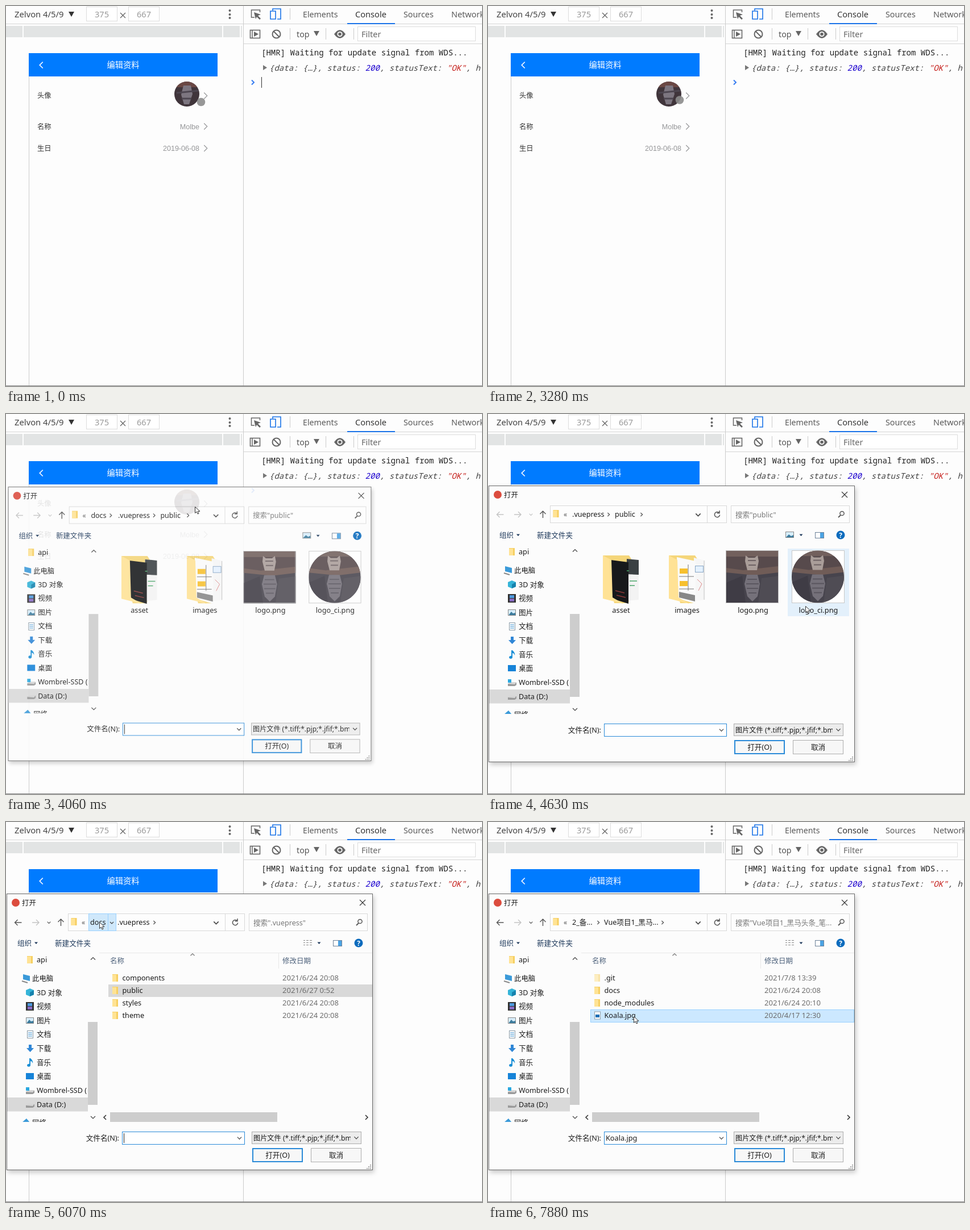
These frames come from a looping animation (837x669 px, 8000 ms). An HTML page:

```html
<!DOCTYPE html>
<html lang="zh">
<head>
<meta charset="utf-8">
<style>
html, body { margin: 0; width: 100%; height: 100%; overflow: hidden; background: #fdfdfd; }
svg { display: block; font-family: "Noto Sans", "Noto Sans CJK SC", "Noto Sans CJK", sans-serif; }
text { white-space: pre; }
.mono { font-family: "Noto Sans Mono", monospace; }
.arial { font-family: "Liberation Sans", sans-serif; }
#frame { filter: drop-shadow(2px 4px 4px rgba(0,0,0,.22)); }
</style>
</head>
<body>
<svg id="stage" width="837" height="669" viewBox="0 0 837 669"></svg>
<script>
const LOOP = 8000;
const text = (x, y, s, fill = '#1c1c1c', size = 12.7, more = '') =>
  `<text x="${x}" y="${y}" fill="${fill}" font-size="${size}" ${more}>${s}</text>`;
const rect = (x, y, w, h, fill, stroke = 'none', sw = 1) =>
  `<rect x="${x}" y="${y}" width="${w}" height="${h}" fill="${fill}" stroke="${stroke}" stroke-width="${sw}"/>`;
const line = (d, stroke, w = 1, fill = 'none') =>
  `<path d="${d}" fill="${fill}" stroke="${stroke}" stroke-width="${w}"/>`;
const shape = (d, fill) => `<path d="${d}" fill="${fill}"/>`;
const dot = (x, y, r, fill, more = '') => `<circle cx="${x}" cy="${y}" r="${r}" fill="${fill}" ${more}/>`;
const clip = (x, y, w, h, s) =>
  `<svg x="${x}" y="${y}" width="${w}" height="${h}" viewBox="${x} ${y} ${w} ${h}">${s}</svg>`;
const at = (x, y, s) => `<g transform="translate(${x} ${y})">${s}</g>`;
// turn: 0 right, 90 down, 180 left, 270 up
const chevron = (x, y, turn = 0, size = 3.5, color = '#444', w = 1.2) =>
  `<path d="M${-size / 2} ${-size}L${size / 2} 0L${-size / 2} ${size}" fill="none" stroke="${color}"
    stroke-width="${w}" transform="translate(${x} ${y}) rotate(${turn})"/>`;
const middle = 'text-anchor="middle"', end = 'text-anchor="end"';

const folder = (x, y, fade = 1) => at(x, y,
  `<g opacity="${fade}">${rect(0, 0, 10, 13, '#f6cf62')}${rect(0, 1, 7, 12, '#ffe394')}</g>`);
const bigFolder = (x, pages) => at(x, 249,
  shape('M0 0H46L50 6V72L44 84H20Z', '#f5d67a') + pages + shape('M0 0L15 8L17 74L36 85L0 76Z', '#ffe295'));
const arrow = (x, y, turn, color) =>
  `<path d="M6 0H-6M-1 -5L-6 0L-1 5" fill="none" stroke="${color}" stroke-width="1.4"
    transform="translate(${x} ${y}) rotate(${turn})"/>`;
const drive = (x, y) => at(x, y, shape('M0 4L4 2H15V6L12 8H0Z', '#9a9a9a') + shape('M0 4L4 1H15L12 5Z', '#d5d5d5'));

const photo = rect(0, 0, 92, 92, '#47444d') + rect(0, 0, 92, 10, '#72605d') + rect(0, 10, 92, 24, '#574a4c') +
  shape('M0 30L30 34L92 27V38L50 43L0 38Z', '#705c57') + shape('M0 56L28 44L34 92H0Z', '#3f3c45') +
  shape('M62 48L92 44V92H56Z', '#4f4c54') +
  shape('M34 8L39 12H50L55 8L57 18L54 34H37L33 18Z', '#a99d99') +
  shape('M36 42H55L59 58L55 80L46 89L37 80L32 58Z', '#75717a') +
  line('M37 50H54M35 58H57M36 66H56M39 74H53', '#5a565f', 2) + line('M38 17H52M39 25H52', '#6e6264', 2);
const avatar = `<g clip-path="url(#round)">${rect(296, 133, 44, 44, '#40353b')}${rect(296, 133, 44, 10, '#6b4844')}
  ${shape('M312 140H325L328 155L322 173H313L308 156Z', '#7d7680')}
  ${line('M300 153L338 149M309 163H326', '#4d4650', 3)}</g>`;

const toolbar = () => text(15, 20, 'Zelvon 4/5/9', '#444', 14.8) + shape('M110 10H120L115 19Z', '#333') +
  rect(141.5, 1.5, 54, 25, '#fff', '#ddd') + rect(215.5, 1.5, 54, 25, '#fff', '#ddd') +
  text(168.5, 20, '375', '#999', 14.5, middle) + text(242.5, 20, '667', '#999', 14.5, middle) +
  line('M201 12L210 21M210 12L201 21', '#666', 1.3) +
  [8, 15, 21].map(y => dot(393.5, y, 2, '#666')).join('') + line('M0 31.5H837', '#d5d5d5') +
  [[0, 29], [31, 349], [382, 29], [413, 2]].map(([x, w]) => rect(x, 35, w, 20, '#e2e4e4')).join('');

const phone = () => line('M40.5 83V669', '#ccc') + rect(40, 83, 332, 41, '#007bff') +
  chevron(62, 104, 180, 5.5, '#fff', 1.6) + text(206, 109, '编辑资料', '#fff', 14.3, middle) +
  text(55, 162, '头像', '#333', 12.3) + text(55, 216.5, '名称', '#333', 12.3) + text(55, 255, '生日', '#333', 12.3) +
  text(340, 216.5, 'Molbe', '#969799', 12.6, end + ' class="arial"') +
  text(340, 255, '2019-06-08', '#969799', 12.5, end + ' class="arial"') +
  [158, 212, 250.5].map(y => chevron(351, y, 0, 5.5, '#969799')).join('') + avatar;

const devtools = () => {
  const gray = '#666';
  return line('M417.5 0V669', '#ccc') +
    line('M437 20H431.5V7H446.5V11', gray, 1.5) + shape('M436 11L448 15L443 17L448 22L446 24L441 19L439 23Z', gray) +
    line('M469 8V5H483V23H477M465 9H474V23H465Z', '#1a73e8', 1.6) +
    line('M499.5 4V24M499.5 39V59M562.5 39V59M611.5 39V59', '#ccc') +
    text(522, 20, 'Elements', '#5a5a5a', 14.2) + text(614, 20, 'Console', '#333', 14.6) +
    text(699, 20, 'Sources', '#5a5a5a', 14.3) + text(783, 20, 'Network', '#5a5a5a', 14.4) +
    rect(600, 30, 84, 2, '#1a73e8') +
    rect(429.5, 42.5, 17, 14, 'none', gray, 1.6) + line('M433 42V57', gray, 1.5) + shape('M436 45L444 49.5L436 54Z', gray) +
    dot(475.5, 49.5, 7, 'none', `stroke="${gray}" stroke-width="2"`) + line('M471 45L480 54', gray, 2) +
    text(511, 54.5, 'top', '#555', 14.3) + shape('M541 44H551L546 53Z', gray) +
    shape('M577 49.5Q587 35 597 49.5Q587 64 577 49.5Z', gray) + dot(587, 49.5, 4.6, '#fdfdfd') + dot(587, 49.5, 2.8, gray) +
    rect(618.5, 36.5, 207, 25, '#fff', '#ddd') + text(625, 55, 'Filter', '#666', 14.5) + line('M418 66.5H837', '#d5d5d5') +
    text(449, 86.5, '[HMR] Waiting for update signal from WDS...', '#222', 14.05, 'class="mono"') +
    shape('M452 104L459 108.5L452 113Z', '#777') +
    text(463, 113.5, '{data: {…}, status: <tspan fill="#1c00cf">200</tspan>, statusText: <tspan fill="#c41a16">"OK"</tspan>, h',
      '#444', 14.05, 'class="mono" font-style="italic"') +
    chevron(434, 134.5, 0, 4, '#367cf1', 2) + line('M0 668.5H837', '#888');
};

const sidebar = () => {
  const names = ['3D 对象', '视频', '图片', '文档', '下载', '音乐', '桌面', 'Wombrel-SSD (', 'Data (D:)'];
  const y = i => 304.5 + i * 24.65;
  return rect(2, 485, 142, 24.5, '#d9d9d9') + folder(37, 236) + text(54, 247, 'api') +
    shape('M30 268L42 271V280L30 277Z', '#3b9ad9') + line('M28 280L38 283', '#888', 2) + text(46, 280, '此电脑', undefined, 12.4) +
    clip(0, 285, 144, 243, names.map((s, i) => text(54, y(i), s, undefined, 12.6)).join('') +
      text(46, 534, '网络', undefined, 12.4) + shape('M28 529L36 522L42 529Z', '#3b9ad9')) +
    shape('M42 293L49 296V304L42 307L35 304V296Z', '#35b4d8') + shape('M42 300L49 296V304L42 307Z', '#1682ad') +
    rect(35, 317, 14, 15, '#333') + rect(38, 319, 8, 5, '#4f9be0') + rect(38, 325, 8, 5, '#8a6cc5') +
    rect(35.5, 344.5, 13, 10, '#d8eefb', '#888') + shape('M37 353L41 348L44 351L48 350V354H37Z', '#3d7d9f') +
    rect(37.5, 367.5, 10, 13, '#fff', '#8a9ba8') + line('M39 371H46M39 374H46M39 377H46', '#3b8fce') +
    shape('M40 392H45V398H49L42.5 405L36 398H40Z', '#2f86d6') +
    shape('M41 416H43Q48 420 47 425Q46 421 43 421V428A3 2.5 0 1 1 41 426Z', '#1b8fd6') +
    rect(35, 442, 14, 11, '#1683d8') + drive(35, 471) + rect(35, 467, 6, 6, '#29a8e0') + drive(35, 495) +
    rect(144, 352, 17, 146, '#cdcdcd') + chevron(153, 240.5, 270, 4) + chevron(153, 520, 90, 4);
};

const dialogBase = () => `<rect id="frame" x="1.5" y="126.5" width="643" height="486" fill="#fcfcfc" stroke="#6a6a6a"/>` +
  dot(17, 142, 7, '#dc4c3e') + text(28, 147, '打开', undefined, 12.4) + line('M622 137L632 147M632 137L622 147', '#333', 1.1) +
  arrow(52, 177, 180, '#c4c4c4') + arrow(96.5, 177, 90, '#555') +
  rect(109.5, 161.5, 310, 30, '#fdfdfd', '#d9d9d9') + line('M385.5 161V192', '#d9d9d9') +
  rect(427.5, 161.5, 208, 30, '#fdfdfd', '#d9d9d9') + folder(114.5, 169) + text(133, 181, '«', '#555', 12) +
  chevron(369.5, 177.5, 90, 4.2, '#444', 1.6) + line('M406 173.5A4.6 4.6 0 1 0 407.6 177.5M407 170V174.5H402.5', '#555', 1.5) +
  dot(622.5, 175, 3.6, 'none', 'stroke="#555" stroke-width="1.5"') + line('M620 178L616 182', '#555', 1.8) +
  text(20, 217.5, '组织', '#1e395b', 12.5) + shape('M50 211.5H56L53 215Z', '#1e395b') + text(86, 217.5, '新建文件夹', '#1e395b', 12.6) +
  shape('M547.5 211.5H553.5L550.5 215Z', '#1e395b') + rect(575.5, 208.5, 15, 10, '#fff', '#6d8299') + rect(584, 209, 6, 9, '#4ba3e3') +
  dot(620, 213, 7.5, '#0b6bbd') + text(620, 217.5, '?', '#fff', 12, middle + ' font-weight="700"') + sidebar() +
  text(199, 561, '文件名(N):', undefined, 12.6, end) + rect(204.5, 545.5, 215, 22, '#fff', '#2a8ad8') + chevron(410.5, 556.5, 90, 3.6) +
  rect(432.5, 545.5, 192, 21, '#ececec', '#adadad') + chevron(616, 556, 90, 3.6) +
  clip(434, 546, 172, 20, text(435, 561, '图片文件 (*.tiff;*.pjp;*.jfif;*.bmp', undefined, 12.2)) +
  rect(434, 575, 87, 23, '#f7f7f7', '#2a8ad8', 2) + text(477.5, 591, '打开(O)', undefined, 12.6, middle) +
  rect(536.5, 574.5, 88, 24, '#f7f7f7', '#adadad') + text(580.5, 591, '取消', undefined, 12.6, middle) +
  [[641, 603], [638, 606], [641, 606], [635, 609], [638, 609], [641, 609]].map(([x, y]) => rect(x - 1, y, 2, 2, '#aaa')).join('');

const project = 'Vue项目1_黑马';
const early = '2021/6/24 20:08';
// crumbs: [label, x, x of the following chevron]
const places = {
  opening: { crumbs: [['docs', 148, 183], ['.vuepress', 196, 260], ['public', 271, 320]], find: '"public"' },
  public: { crumbs: [['.vuepress', 148, 212], ['public', 223, 270]], find: '"public"' },
  vuepress: { crumbs: [['docs', 148, 186], ['.vuepress', 196, 261]], find: '".vuepress"', chosen: 1,
    rows: [['components', early], ['public', '2021/6/27 0:52'], ['styles', early], ['theme', early]] },
  docs: { crumbs: [[project + '...', 148, 256], ['docs', 268, 308]], find: '"docs"', chosen: 0,
    rows: [['.vuepress', early], ['api', early]] },
  project: { crumbs: [['2_备...', 148, 194], [project + '...', 204, 307]], find: `"${project}头条_笔...`, chosen: 1,
    rows: [['.git', '2021/7/8 13:39'], ['docs', early], ['node_modules', '2021/6/24 20:10'], ['Koala.jpg', '2020/4/17 12:30']] }
};

const grid = hover => (hover ? rect(527, 237, 108, 119, '#e3f0fb') : '') +
  bigFolder(202, shape('M42 6L63 8V78L42 80Z', '#f3f3f3') + shape('M42 6L63 8V34L42 33Z', '#3a4043') +
    shape('M14 8L45 12V85L16 76Z', '#17191b') + line('M42 27H46M47 45H60M47 53H56', '#4ba66b', 1.5) +
    line('M22 62L38 66M24 70L40 74', '#8d3838', 1.5)) +
  bigFolder(318, shape('M44 4L64 9V78L44 80Z', '#f6f6f6') + line('M62 9V78', '#c5c5c5') +
    shape('M14 3L47 10V85L16 76Z', '#fafafa') + rect(19, 23, 14, 9, '#f7c02e') + rect(19, 45, 14, 9, '#f7c02e') +
    shape('M18 64L46 70V81L18 74Z', '#888') + line('M18 37H44M18 59H44M34 16V62', '#777') +
    rect(46.5, 18.5, 14, 11, '#e4f1ff', '#8aa7c5') + line('M50 42L58 50L52 62', '#d88')) +
  at(419, 241, photo) + rect(418.5, 240.5, 92, 92, 'none', '#bbb') +
  rect(534.5, 240.5, 92, 92, '#fff', '#c8c8c8') + at(534, 240.5, `<g clip-path="url(#disc)">${photo}</g>`) +
  [['asset', 234], ['images', 350], ['logo.png', 466], ['logo_ci.png', 581]].map(([s, x]) => text(x, 350, s, undefined, 12.8, middle)).join('') +
  rect(523.5, 207.5, 14, 10, '#d8eefb', '#888') + shape('M524 217L529 212L533 215L537 213V217Z', '#3d7d9f');

const list = ({ rows, chosen }, hover, picked) => {
  const row = ([name, date], i) => {
    const y = 275 + i * 22, koala = name.endsWith('.jpg');
    const back = koala && picked ? rect(180.5, y - 10.5, 463, 22, '#cce8ff', '#99d1ff')
      : koala && hover ? rect(180, y - 11, 464, 22, '#e5f3ff')
      : i == chosen && !picked ? rect(180, y - 11, 464, 22, '#d9d9d9') : '';
    const icon = koala ? rect(187.5, y - 7, 10, 13, '#fff', '#8a9ba8') + rect(189, y - 2, 7, 5, '#1d6fb5')
      : folder(187, y - 7, name == '.git' ? .55 : 1);
    return back + icon + text(204.5, y + 4, name) + text(486, y + 4, date, '#6d6d6d', 13.1);
  };
  return line('M164 230.5H644M479.5 231V258', '#e8e8e8') + chevron(328, 233.5, 270, 3.5, '#777') +
    text(183, 249, '名称', '#4c607a', 12.5) + text(486, 249, '修改日期', '#4c607a', 12.5) + rows.map(row).join('') +
    rect(183, 511, 294, 17, '#cdcdcd') + chevron(174, 520, 180, 4, '#333', 1.6) + chevron(634, 520, 0, 4, '#333', 1.6) +
    [208, 212, 216].map(y => line(`M523 ${y}.5H526M528 ${y}.5H532M534 ${y}.5H538`, '#888')).join('');
};

const address = (name, hover) => {
  const { crumbs, find } = places[name];
  const wide = name == 'project' && hover;
  const edge = { public: 220, vuepress: 193, docs: 266 }[name];
  let out = '';
  if (wide) out += rect(201.5, 161.5, 113, 30, '#e0f0fc', '#a9d5f5');
  else if (hover) out += rect(145.5, 161.5, edge - 145, 30, '#cfe8fb', '#99d1ff') + line(`M${edge - 14}.5 162V191`, '#99d1ff');
  crumbs.forEach(([s, x, next], i) => {
    const last = wide && i == 1;
    out += text(last ? 205 : x, 181, last ? project + '头...' : s, undefined, 12.6);
    if (!last) out += hover && !wide && !i ? chevron(edge - 7, 177.5, 90, 3) : chevron(next, 177, 0, 3.2);
  });
  return out + clip(428, 162, 178, 29, text(435, 181.5, '搜索' + find, '#777', 12.6));
};

const dialog = t => {
  const name = step([[0, 'opening'], [4210, 'public'], [5440, 'vuepress'], [6220, 'docs'], [7060, 'project']], t);
  const hover = within(t, 5290, 5440) || within(t, 6070, 6220) || within(t, 6800, 7450);
  const caret = within(t, 0, 4360) || within(t, 5020, 5560) || within(t, 6070, 6500) || within(t, 7060, 7580);
  const place = places[name], moved = !!place.rows, picked = t >= 7880;
  return arrow(21.5, 177, 0, moved ? '#555' : '#c4c4c4') + chevron(75.5, 177, 90, 2.8, moved ? '#555' : '#c4c4c4') +
    address(name, hover) + (moved ? list(place, t >= 7580, picked) : grid(within(t, 4630, 4750))) +
    (picked ? text(207, 561, 'Koala.jpg') : '') + (caret ? line('M207.5 548V565', '#222') : '');
};

const pointer = t => {
  if (t < 3550) {
    const [x, y] = step([[0, [343, 169]], [2980, [339.5, 166.5]], [3130, [337, 165.5]]], t);
    return dot(x, y, 7.3, '#8c8c8c', 'fill-opacity=".9"');
  }
  const [x, y] = step([[0, [332, 163]], [4360, [410, 240]], [4480, [500, 360]], [4630, [558, 338]], [4750, [400, 245]],
    [4870, [204, 138]], [5020, [172, 152]], [5140, [160, 170]], [5290, [164, 176]], [6370, [170, 177]], [6800, [184, 176]],
    [7060, [196, 176]], [7450, [235, 262]], [7580, [264, 334]], [7730, [256, 342]]], t);
  return at(x, y, line('M.5 .5V11.5L3.2 9L5 13L7 12.2L5.2 8.3H9Z', '#333', 1, '#fff'));
};

const step = (marks, t) => marks.filter(([start]) => t >= start).pop()[1];
const within = (t, a, b) => t >= a && t < b;
const $ = id => document.getElementById(id);

$('stage').innerHTML = `<clipPath id="round">${dot(318, 155, 22)}</clipPath><clipPath id="disc">${dot(46, 46, 46)}</clipPath>` +
  toolbar() + phone() + devtools() + '<g id="prompt"></g><g id="dialog">' + dialogBase() + '<g id="content"></g></g><g id="pointer"></g>';

const shown = {};
const put = (id, markup) => {
  if (shown[id] !== markup) $(id).innerHTML = shown[id] = markup;
};

function draw() {
  const t = performance.now() % LOOP;
  const [alpha, scale] = step([[0, [0, 1]], [3810, [.2, .96]], [3940, [.55, .977]], [4060, [.88, .992]], [4210, [1, 1]]], t);
  $('dialog').setAttribute('opacity', alpha);
  $('dialog').setAttribute('transform', `translate(322.5 369.5) scale(${scale}) translate(-322.5 -369.5)`);
  put('prompt', t < 310 || within(t, 740, 1300) ? line('M449.5 125V144', '#333') : '');
  put('content', dialog(t));
  put('pointer', pointer(t));
  requestAnimationFrame(draw);
}
draw();
</script>
</body>
</html>
```
